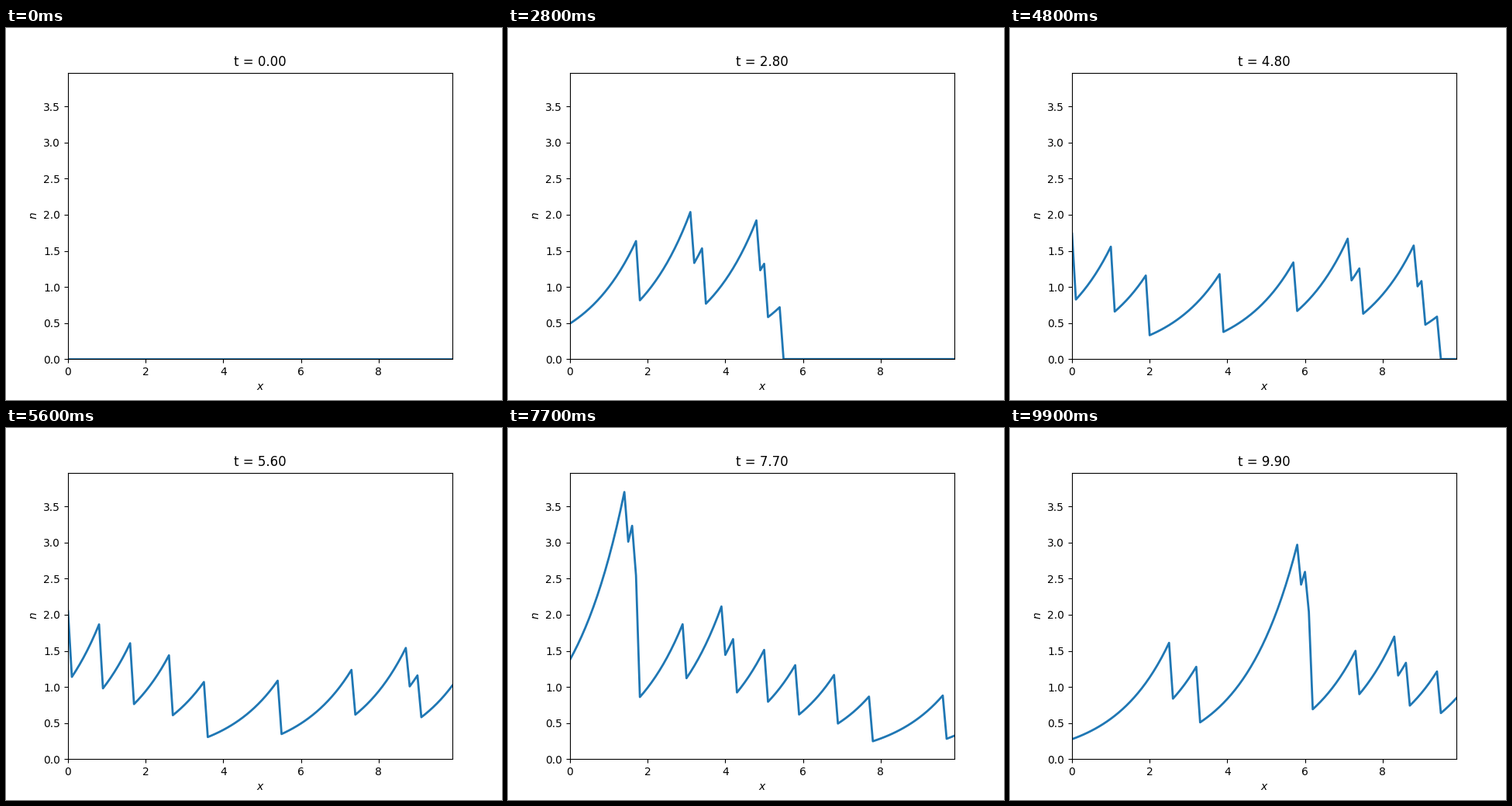
Recreate the animation shown at these times as a matplotlib script. Size 640 by 480 pixels, loop 10000 ms.

```python
import numpy as np
import matplotlib.pyplot as plt
from matplotlib.animation import FuncAnimation

FRAMES = 100
DT = 0.01              # time step
SPEED = 2.0            # drift velocity
LOSS = 0.1             # decay rate while drifting
KEEP = 1 - 1.5 * DT    # share left at the inlet after one step

# Key points: the irregular moments of unit injections, in time steps
BURSTS = np.array([
    6, 30, 39, 108, 120.2, 191.9, 290, 380.5, 429.5, 478,
    519.5, 559.3, 570.6, 621.8, 681, 682, 685.5, 697.2, 826.2, 861,
])

x = np.linspace(0, 9.9, 100)
delay = 5 * np.arange(x.size)    # steps the flow needs to reach each x


def inlet(step):
    """Density at x = 0: each burst adds one and then dies away."""
    age = step[:, None] - BURSTS
    return np.where(age >= 0, KEEP ** age, 0).sum(axis=1)


def density(i):
    """The inlet signal carried along x with a slow loss."""
    return inlet(10 * i - delay) * np.exp(-LOSS * x / SPEED)


fig, ax = plt.subplots(figsize=(6.4, 4.8), dpi=100)
line, = ax.plot(x, density(0), lw=2)
title = ax.set_title("t = 0.00")
ax.set(xlim=(x[0], x[-1]), xlabel="$x$", ylabel="$n$")
ax.set_ylim(0, max(density(i).max() for i in range(FRAMES)))


def update(i):
    line.set_ydata(density(i))
    title.set_text(f"t = {10 * i * DT:.2f}")
    return line, title


anim = FuncAnimation(fig, update, frames=FRAMES, interval=100,
                     repeat=True, repeat_delay=0)
plt.show()
```
